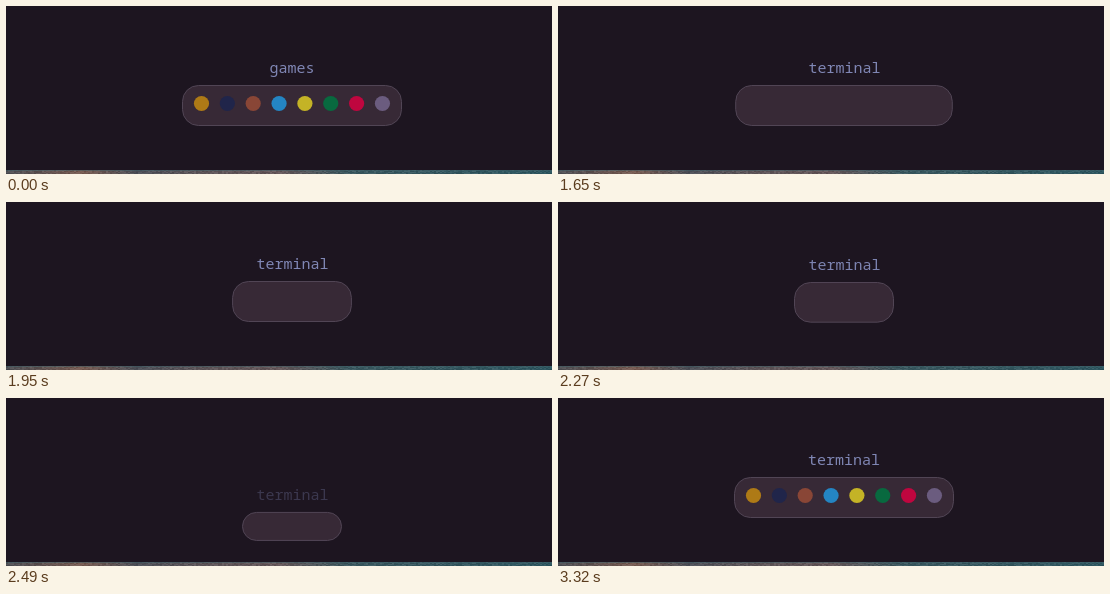
An HTML page with a canvas that plays this animation: 546 by 168 pixels, repeating every 3660 ms.

```html
<!DOCTYPE html>
<html lang="en">
<head>
<meta charset="utf-8">
<style>
  html, body { margin: 0; width: 100%; height: 100%; overflow: hidden; background: #1d1520; }
  canvas { display: block; }
</style>
</head>
<body>
<canvas id="stage" width="546" height="168"></canvas>
<script>
const ctx = document.getElementById('stage').getContext('2d');
const W = 546, H = 168, LOOP = 3660, CX = 286;
const DOTS = ['#ae7a16', '#20254a', '#894636', '#2485c3', '#c4b326', '#08693f', '#bf063f', '#6b5c7f'];
const T = { label: 1050, dotsOff: 1520, shrink: 1630, drop: 2250, reset: 3320, ease: 600 };

const mix = (a, b, p) => a + (b - a) * p;

// cubic-bezier(.25, .1, .25, 1), solved by bisection
function ease(x) {
  if (x <= 0) return 0;
  if (x >= 1) return 1;
  const bez = (u, a, b) => 3 * u * (1 - u) * (1 - u) * a + 3 * u * u * (1 - u) * b + u * u * u;
  let lo = 0, hi = 1;
  for (let i = 0; i < 24; i++) {
    const mid = (lo + hi) / 2;
    if (bez(mid, 0.25, 0.25) < x) lo = mid; else hi = mid;
  }
  return bez(lo, 0.1, 1);
}

// thin slice of wallpaper along the bottom edge
function makeStrip() {
  const strip = document.createElement('canvas');
  strip.width = W;
  strip.height = 4;
  const c = strip.getContext('2d');
  const grad = c.createLinearGradient(0, 0, W, 0);
  [[0, '#4c4d53'], [0.14, '#77594f'], [0.24, '#4a4d56'], [0.36, '#5c5357'],
   [0.5, '#66575a'], [0.63, '#38575f'], [1, '#2c5660']].forEach(s => grad.addColorStop(...s));
  c.fillStyle = grad;
  c.fillRect(0, 0, W, 4);
  let seed = 7;
  const rand = () => (seed = seed * 16807 % 2147483647) / 2147483647;
  for (let x = 0; x < W; x += 2) {
    for (let y = 0; y < 4; y++) {
      const shade = rand() < 0.5 ? 0 : 190;
      c.fillStyle = `rgba(${shade},${shade},${shade},${rand() * 0.13})`;
      c.fillRect(x, y, 2, 1);
    }
  }
  c.fillStyle = 'rgba(60,95,102,.5)';
  c.fillRect(0, 0, W, 1);
  return strip;
}
const strip = makeStrip();

function drawLabel(text, x, y, alpha) {
  ctx.globalAlpha = alpha;
  ctx.fillStyle = '#8087b5';
  ctx.font = '15px "Noto Sans Mono", "DejaVu Sans Mono", monospace';
  ctx.textAlign = 'center';
  ctx.fillText(text, x, y);
  ctx.globalAlpha = 1;
}

function drawPill(width, top, bottom) {
  const h = bottom - top - 1;
  ctx.beginPath();
  ctx.roundRect(CX - width / 2 + 0.5, top + 0.5, width - 1, h, Math.min(16, h / 2));
  ctx.fillStyle = '#372936';
  ctx.fill();
  ctx.strokeStyle = '#514555';
  ctx.lineWidth = 1;
  ctx.stroke();
}

function drawDots() {
  DOTS.forEach((color, i) => {
    ctx.fillStyle = color;
    ctx.beginPath();
    ctx.arc(195.5 + i * 25.85, 97.5, 7.6, 0, Math.PI * 2);
    ctx.fill();
  });
}

function draw(t) {
  const open = t < T.dotsOff || t >= T.reset;
  const shrink = open ? 0 : ease((t - T.shrink) / T.ease);
  const drop = open ? 0 : ease((t - T.drop) / T.ease);

  ctx.fillStyle = '#1d1520';
  ctx.fillRect(0, 0, W, H);
  ctx.drawImage(strip, 0, 164);

  drawPill(mix(220, 100, shrink), mix(79, 130, drop), mix(120, 153.5, drop));
  if (open) drawDots();
  drawLabel(t < T.label ? 'games' : 'terminal', open ? CX : CX + 0.5, mix(67, 118, drop), 1 - drop);
}

const start = performance.now();
function tick() {
  draw((performance.now() - start) % LOOP);
  requestAnimationFrame(tick);
}
tick();
</script>
</body>
</html>
```
